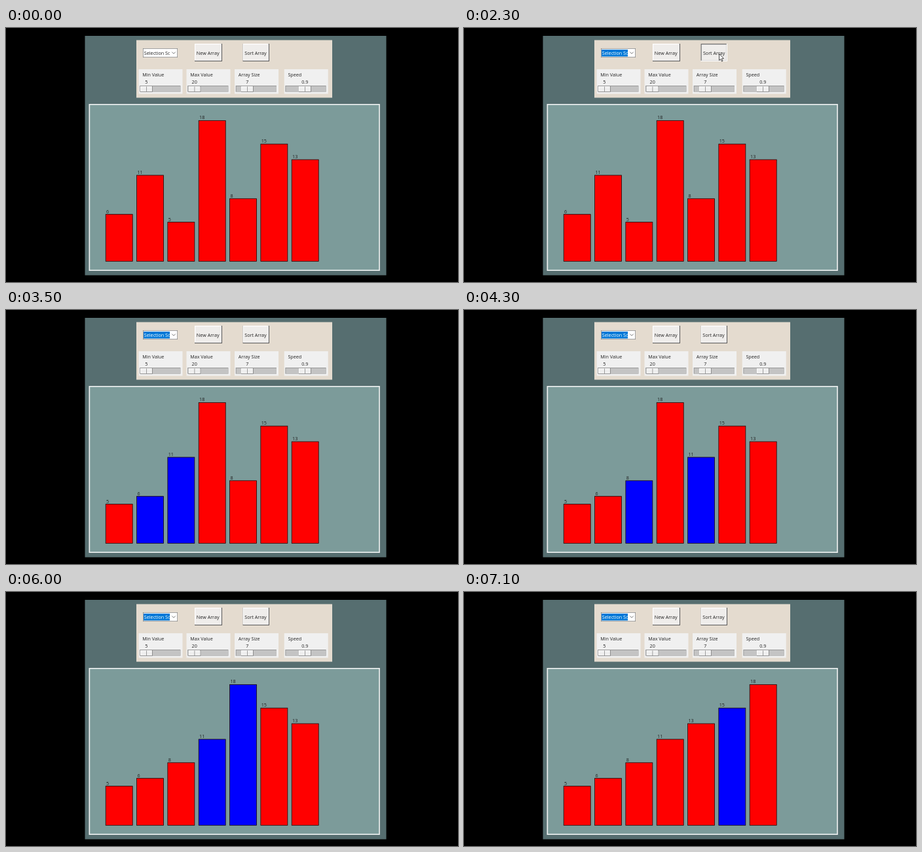
Recreate the animation shown at these times as an HTML page with a canvas. Size 690 by 388 pixels, loop 8 s.

```html
<!DOCTYPE html>
<html lang="en">
<head>
<meta charset="utf-8">
<title>Selection sort</title>
<style>
html, body { margin: 0; width: 100%; height: 100%; overflow: hidden; background: #000; }
canvas { display: block; width: 690px; height: 388px; }
</style>
</head>
<body>
<canvas id="stage" width="690" height="388"></canvas>
<script>
const ctx = document.getElementById('stage').getContext('2d');
const LOOP = 8000;
const TICK = 100;
const FONT = '7.2px "Open Sans", "Noto Sans", sans-serif';
const START = [6, 11, 5, 18, 8, 15, 13];
const SWAPS = [2500, 3400, 4300, 5300, 6200, 7100];
const SLIDERS = [
  { x: 202.5, name: 'Min Value', value: '5', knob: 214 },
  { x: 275.5, name: 'Max Value', value: '20', knob: 287.5 },
  { x: 349, name: 'Array Size', value: '7', knob: 368 },
  { x: 424.7, name: 'Speed', value: '0.9', knob: 456 }
];

function rect(x, y, w, h, color) {
  ctx.fillStyle = color;
  ctx.fillRect(x, y, w, h);
}

function text(str, x, y, color = '#222', align = 'left') {
  ctx.fillStyle = color;
  ctx.textAlign = align;
  ctx.fillText(str, x, y);
}

function line(points, color, width) {
  ctx.beginPath();
  points.forEach(([x, y]) => ctx.lineTo(x, y));
  ctx.strokeStyle = color;
  ctx.lineWidth = width;
  ctx.stroke();
}

// Bevelled box: light upper left edge, dark lower right edge
function bevel(x, y, w, h, face, light, dark, size = 1) {
  rect(x, y, w, h, dark);
  rect(x, y, w - size, h - size, light);
  rect(x + size, y + size, w - 2 * size, h - 2 * size, face);
}

function button(label, x, w, pressed) {
  const [light, dark] = pressed ? ['#6a6a6a', '#fff'] : ['#fff', '#5c5c5c'];
  bevel(x, 24, w, 27, '#efedeb', light, dark, 1.2);
  const shift = pressed ? 0.7 : 0;
  text(label, x + w / 2 - 0.8 + shift, 40.5 + shift, '#222', 'center');
}

function combo(selected) {
  rect(209, 31, 53, 14, '#7a7a7a');
  rect(209.7, 31.7, 51.6, 12.6, '#fff');
  if (selected) rect(210, 33, 40, 10.5, '#0078d7');
  ctx.save();
  ctx.beginPath();
  ctx.rect(210, 32, 39.8, 12);
  ctx.clip();
  text('Selection Sort', 210.8, 40.5, selected ? '#fff' : '#222');
  ctx.restore();
  line([[253.3, 36.6], [256, 39.3], [258.7, 36.6]], '#555', 0.8);
}

function slider({ x, name, value, knob }) {
  rect(x, 63, 67, 37.5, '#f0f0f0');
  text(name, x + 5.7, 74);
  text(value, knob + 0.2, 84.7, '#222', 'center');
  bevel(x + 1.7, 88, 63, 10.3, '#c4c4c4', '#8c8c8c', '#f8f8f8', 0.8);
  bevel(knob - 9, 89, 18.7, 8.6, '#efefef', '#fff', '#777', 0.8);
  rect(knob, 89.5, 0.8, 7.6, '#888');
}

// Array and highlighted pair after a number of selection sort passes
function sortState(passes) {
  const list = [...START];
  let marked = [];
  for (let i = 0; i < passes; i++) {
    const min = list.indexOf(Math.min(...list.slice(i)));
    [list[i], list[min]] = [list[min], list[i]];
    marked = [i, min];
  }
  return { list, marked };
}

function bars(t) {
  const { list, marked } = sortState(SWAPS.filter(s => t >= s).length);
  list.forEach((v, i) => {
    const x = 152.2 + i * 47.33;
    const h = v * 11.94;
    const y = 356.3 - h;
    rect(x, y, 41, h, marked.includes(i) ? '#00f' : '#f00');
    ctx.strokeStyle = '#1c0808';
    ctx.lineWidth = 0.8;
    ctx.strokeRect(x, y, 41, h);
    text(v, x + 0.9, y - 2);
  });
}

function pointerAt(t) {
  if (t < 1200 || t >= 3300) return null;
  if (t >= 3200) return [527, 118];
  const p = Math.min(1, (t - 1200) / 800);
  const rest = (1 - p) ** 2;
  return [389.5 + 86 * rest, 39.5 + 140 * rest];
}

function pointer(x, y) {
  const shape = [[0, 0], [0, 10], [2.3, 7.9], [3.9, 11.5], [5.5, 10.8], [3.9, 7.3], [7, 7.1]];
  ctx.beginPath();
  shape.forEach(([dx, dy]) => ctx.lineTo(x + dx, y + dy));
  ctx.closePath();
  ctx.fillStyle = '#fff';
  ctx.fill();
  ctx.strokeStyle = '#222';
  ctx.lineWidth = 0.8;
  ctx.stroke();
}

function draw(t) {
  ctx.font = FONT;
  rect(0, 0, 690, 388, '#000');
  rect(120.5, 12, 460, 365.7, '#566e70');
  rect(199, 18.5, 299, 88, '#e4dbcf');
  combo(t >= 1200);
  button('New Array', 288, 42, false);
  button('Sort Array', 361.5, 40.5, t >= 2300 && t < 2500);
  SLIDERS.forEach(slider);
  rect(126.5, 116, 444.3, 255, '#f0f2f2');
  rect(128.2, 117.6, 441, 251.8, '#7c9b9a');
  bars(t);
  const at = pointerAt(t);
  if (at) pointer(...at);
}

const begin = performance.now();
function frame() {
  const t = (performance.now() - begin) % LOOP;
  draw(Math.floor(t / TICK) * TICK);
  requestAnimationFrame(frame);
}
frame();
</script>
</body>
</html>
```
